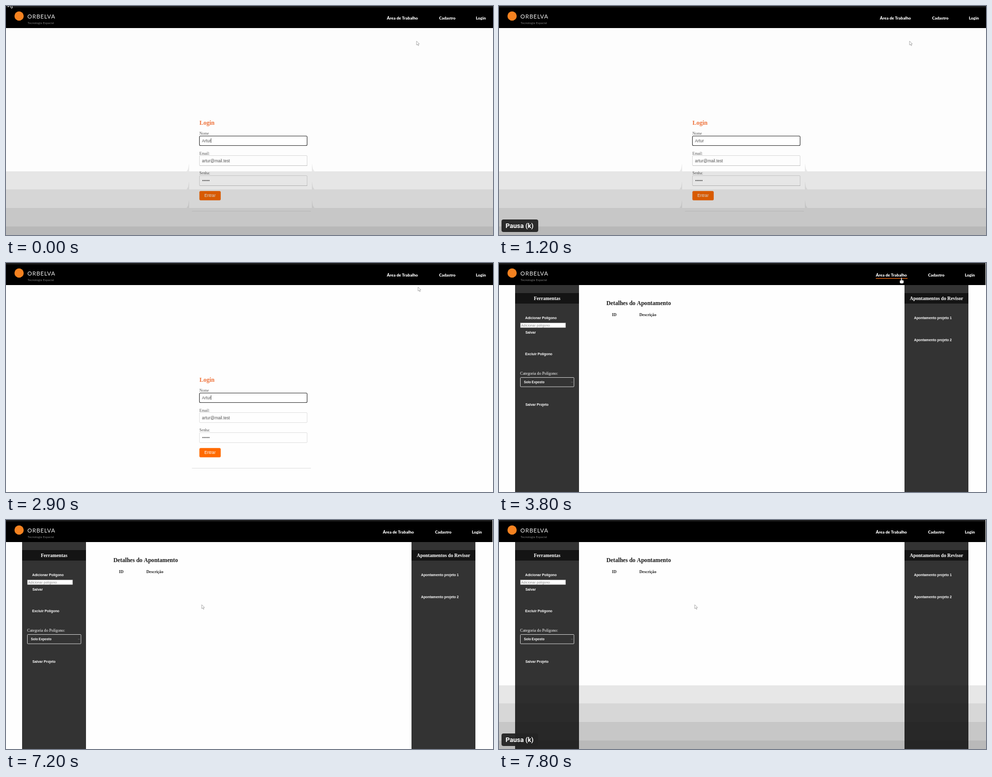
Animation of 968 by 457 pixels, one loop 8 s. Source, as an HTML page with a canvas:

```html
<!DOCTYPE html>
<html lang="pt-BR">
<head>
<meta charset="utf-8">
<title>Área de Trabalho</title>
<style>
  html, body { margin: 0; width: 100%; height: 100%; overflow: hidden; background: #fefefe; }
  canvas { display: block; }
</style>
</head>
<body>
<canvas id="stage" width="968" height="457"></canvas>
<script>
const W = 968, H = 457, LOOP = 8000, STEP = 100;
const PAGE_CHANGE = 3700, PLAYING = 1300;
const HOVER = { from: 3200, to: 4100 };
const ctx = document.getElementById('stage').getContext('2d');

const SERIF = '"Liberation Serif", serif';
const SANS = '"Liberation Sans", sans-serif';
const NAV_FONT = '900 8.1px Lato, sans-serif';
const ITEM_FONT = '700 6.85px ' + SANS;
const INPUT_FONT = '8.2px ' + SANS;

const ARROW = new Path2D('M0 0V16L4 12.5L6.5 18.5L9 17.5L6.5 11.5H11.5Z');

// Each move eases from the previous resting place; lift bows the path upwards.
const MOVES = [
  { from: 0, to: 0, x: 816, y: 70 },
  { from: 2800, to: 2900, x: 819, y: 48 },
  { from: 2900, to: 3200, x: 799, y: 29 },
  { from: 4000, to: 4300, x: 524, y: 206 },
  { from: 4400, to: 4600, x: 480, y: 159 },
  { from: 4700, to: 5100, x: 533, y: 145, lift: 28 },
  { from: 5200, to: 5300, x: 679, y: 199 },
  { from: 5300, to: 6100, x: 389, y: 169, lift: 125 }
];

const clamp = v => Math.max(0, Math.min(1, v));
const ease = p => p * p * (3 - 2 * p);

function pointerAt(t) {
  let x = 0, y = 0;
  for (const m of MOVES) {
    if (t < m.from) break;
    const p = m.to > m.from ? ease(clamp((t - m.from) / (m.to - m.from))) : 1;
    x += (m.x - x) * p;
    y += (m.y - y) * p - (m.lift || 0) * Math.sin(Math.PI * p);
  }
  return [x, y];
}

function rect(x, y, w, h, color) {
  ctx.fillStyle = color;
  ctx.fillRect(x, y, w, h);
}

function box(x, y, w, h, r, fill, stroke, line = 1) {
  ctx.beginPath();
  ctx.roundRect(x, y, w, h, r);
  if (fill) { ctx.fillStyle = fill; ctx.fill(); }
  if (stroke) { ctx.strokeStyle = stroke; ctx.lineWidth = line; ctx.stroke(); }
}

function disc(x, y, r, color) {
  ctx.fillStyle = color;
  ctx.beginPath();
  ctx.arc(x, y, r, 0, Math.PI * 2);
  ctx.fill();
}

function text(str, x, y, font, color, align = 'left', spacing = 0) {
  ctx.font = font;
  ctx.fillStyle = color;
  ctx.textAlign = align;
  ctx.letterSpacing = spacing + 'px';
  ctx.fillText(str, x, y);
}

function arrow(x, y, scale, fill, stroke, line) {
  ctx.save();
  ctx.translate(x, y);
  ctx.scale(scale, scale);
  ctx.fillStyle = fill;
  ctx.strokeStyle = stroke;
  ctx.lineWidth = line / scale;
  ctx.fill(ARROW);
  ctx.stroke(ARROW);
  ctx.restore();
}

function hand(x, y) {
  box(x - 2.5, y + 5, 8, 7, 2.5, '#fff', '#222', .8);
  box(x, y, 2, 8, 1, '#fff', '#222', .6);
  rect(x, y + 5.6, 2, 4, '#fff');
}

function header(navX, width, hover) {
  rect(0, 0, width, 44, '#000');
  rect(0, 0, width, 3, '#1a1a1a');
  disc(26, 20, 9.2, '#f58220');
  text('ORBELVA', 42.5, 24.7, '11.3px Lato, sans-serif', '#f2f2f2', 'left', .9);
  text('Tecnologia Espacial', 43, 36, '5.9px Lato, sans-serif', '#808080', 'left', .15);
  text('Área de Trabalho', navX, 27.2, NAV_FONT, '#fff');
  text('Cadastro', navX + 103.7, 27.2, NAV_FONT, '#fff');
  text('Login', navX + 177, 27.2, NAV_FONT, '#fff');
  if (hover) rect(navX, 30, 63, 1.3, '#ee6a12');
}

function caretVisible(t) {
  return t < 1200 || (t >= 1800 && t < 2200) || (t >= 2700 && t < 3200);
}

function loginPage(t, shaded, hover) {
  rect(0, 0, W, H, shaded ? '#fdfdfd' : '#fefefe');
  header(757, W, hover);
  text('Login', 384.5, 237, '700 12px ' + SERIF, '#ee7038');

  ['Nome', 'Email:', 'Senha:'].forEach((label, i) => {
    const y = 259 + 39.5 * i;
    text(label, 384.5, y - 2, '7.7px ' + SERIF, '#555');
    if (i === 0) box(384.5, 259.5, 214, 19, 2, '#fff', '#303030', 1.1);
    else box(384.5, Math.floor(y) + .5, 214, 20, 1.5, null, shaded ? '#d8d8d8' : '#e0e0e0');
    if (i && shaded) rect(385, Math.floor(y) + 20, 214, 1, '#c4c4c4');
  });

  text('Artur', 389.5, 271.6, INPUT_FONT, '#555');
  if (caretVisible(t)) rect(407, 264, 1, 9, '#555');
  text('artur@mail.test', 389.5, 311.5, INPUT_FONT, '#555');
  for (let i = 0; i < 5; i++) disc(391.4 + i * 3, 348.3, 1.1, '#444');
  box(384.4, 369.2, 42.4, 18.6, 2.5, '#ff6a00');
  text('Entrar', 405.5, 381.4, INPUT_FONT, '#fff', 'center');
  rect(369.5, 409, 236.5, 1, shaded ? '#eaeaea' : '#dedede');
}

function sidebar(x, title) {
  rect(x, 44, 127, H - 44, '#333');
  rect(x, 60, 127, 21, '#141414');
  text(title, x + 63.5, 74, '700 9.6px ' + SERIF, '#fff', 'center');
}

function workPage(hover) {
  rect(0, 0, W, H, '#fefefe');
  header(749, W - 1, hover);

  sidebar(32, 'Ferramentas');
  text('Adicionar Polígono', 52, 112.3, ITEM_FONT, '#fff');
  box(42.5, 119.5, 90, 9.5, 0, '#fff', '#8a8a8a', .6);
  text('Adicionar polígono', 44, 126.6, '6.9px ' + SANS, '#8a8a8a');
  text('Salvar', 52.5, 140.7, ITEM_FONT, '#fff');
  text('Excluir Polígono', 52, 184.2, ITEM_FONT, '#fff');
  text('Categoria do Polígono:', 42, 223.2, '8.15px ' + SERIF, '#fff');
  box(42.5, 228.5, 106.5, 18.5, 1, '#333', '#d0d0d0');
  text('Solo Exposto', 49.5, 240.2, '700 6.4px ' + SANS, '#fff');
  rect(143, 237.5, 4, .8, '#666');
  text('Salvar Projeto', 52.5, 284.5, ITEM_FONT, '#fff');

  text('Detalhes do Apontamento', 213.5, 83.6, '700 11.6px ' + SERIF, '#161616');
  text('ID', 224.5, 105.8, '700 8.1px ' + SERIF, '#222');
  text('Descrição', 279, 105.8, '700 8.1px ' + SERIF, '#222');

  sidebar(806, 'Apontamentos do Revisor');
  for (let i = 0; i < 2; i++) {
    text('Apontamento projeto ' + (i + 1), 825, 112.3 + 43.4 * i, ITEM_FONT, '#fff');
  }
}

function notch(x, y, dir) {
  ctx.beginPath();
  ctx.moveTo(x, y - 16);
  ctx.lineTo(x + dir * 2, y - 5);
  ctx.lineTo(x + dir * 5, y);
  ctx.lineTo(x, y);
  ctx.fill();
}

// Player shading: four evenly spaced bands, each darker than the last.
function shade(amount, withCard) {
  for (let i = 0; i < 4; i++) {
    const top = Math.round(329.6 + 36.7 * i);
    const bottom = i < 3 ? Math.round(329.6 + 36.7 * (i + 1)) : H;
    rect(0, top, W, bottom - top, `rgba(0,0,0,${(.09 + .062 * i) * amount})`);
    if (withCard && i < 3) {
      ctx.fillStyle = `rgba(0,0,0,${.08 * amount})`;
      notch(364, top, -1);
      notch(608, top, 1);
    }
  }
}

function tooltip(label, width) {
  box(5, 426, width, 25, 4, 'rgba(35,35,35,.95)');
  text(label, 13, 443, '700 13px Roboto, sans-serif', '#fff');
}

function draw(now) {
  const t = Math.floor((now % LOOP) / STEP) * STEP;
  const onLogin = t < PAGE_CHANGE;
  const hover = t >= HOVER.from && t < HOVER.to;
  const shading = t < PLAYING ? 1 : clamp((t - 7300) / 300);

  if (onLogin) loginPage(t, shading > 0, hover);
  else workPage(hover);

  const [x, y] = pointerAt(t);
  if (hover) hand(x, y);
  else arrow(x, y, .5, '#fff', '#999', .8);

  if (shading) shade(shading, onLogin);

  if (t >= 600 && t < 1000) tooltip('Reproduzir (k)', 100);
  else if ((t >= 1000 && t < PLAYING) || t >= 7800) tooltip('Pausa (k)', 73);

  // The viewer's pointer swings round from the top left to the player controls.
  if (t < 600) {
    const p = t / 600;
    arrow(4 + 232 * Math.sin(Math.PI * p), -14 + 484 * ease(p), 1, '#000', '#fff', 1);
  }
}

function tick() {
  draw(performance.now());
  requestAnimationFrame(tick);
}
tick();
</script>
</body>
</html>
```
